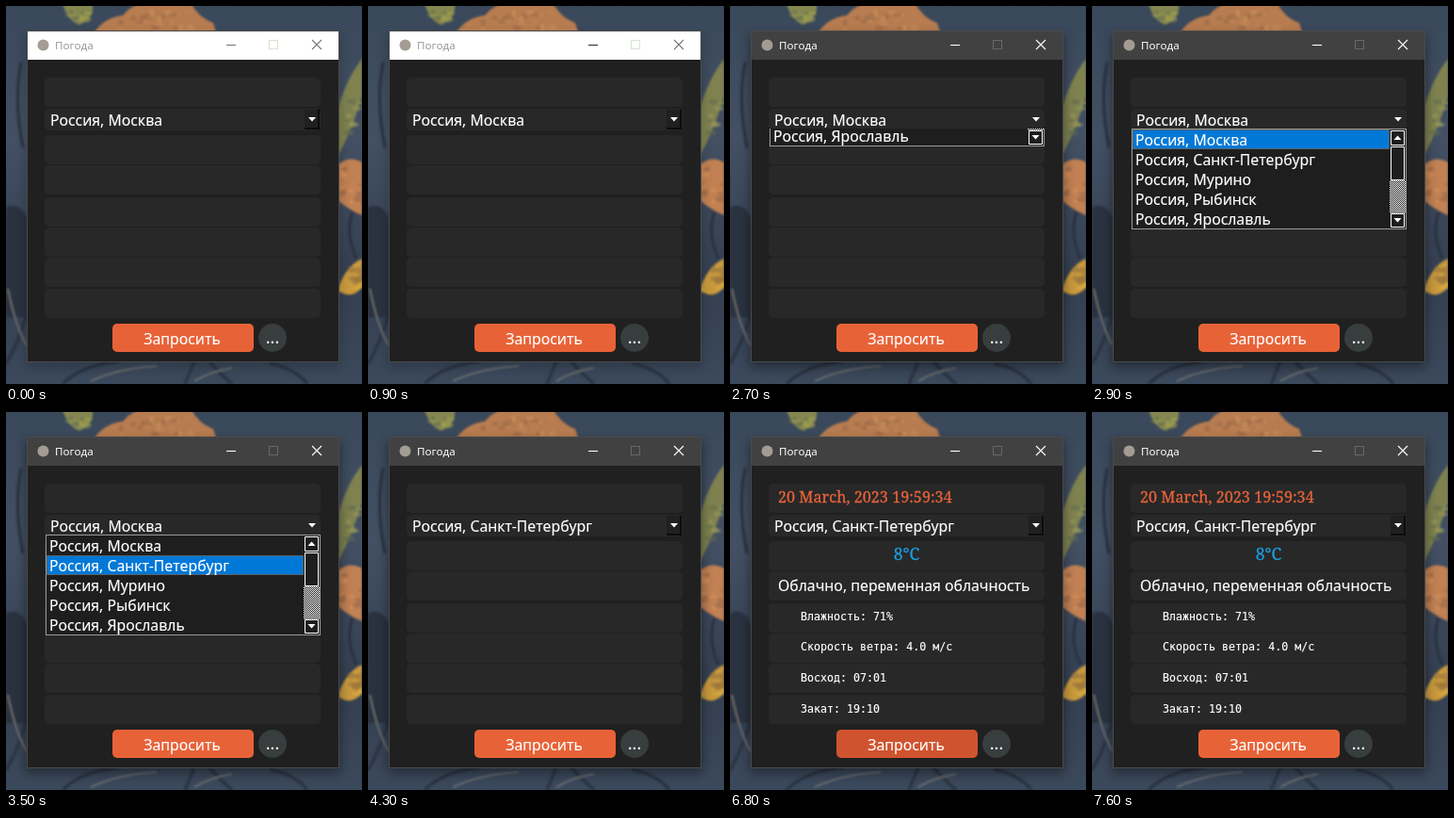
These frames come from a looping animation (378 px wide and 401 px high, 8000 ms). An HTML page:

```html
<!DOCTYPE html>
<html lang="ru">
<meta charset="utf-8">
<title>Погода</title>
<style>
  html, body { margin: 0; width: 100%; height: 100%; overflow: hidden; background: #364457 }
  svg { display: block }
  text { font: 15.75px "Noto Sans", "Open Sans", sans-serif; fill: #fff; stroke: #fff; stroke-width: .15; white-space: pre }
  #title { font-size: 11.6px; stroke: none }
  .mono { font: 11.65px "DejaVu Sans Mono", monospace }
  .slab { font: 16.2px "Noto Serif", serif; fill: #e8633a; stroke: #e8633a; stroke-width: .3 }
  .slab.blue { font-size: 17.5px; fill: #1b9fe0; stroke: #1b9fe0 }
  .icon { fill: none; stroke-width: 1.1 }
  .row { fill: #282828 }
</style>
<svg width="378" height="401" viewBox="0 0 378 401">
  <defs>
    <linearGradient id="sky" x2="0" y2="1">
      <stop stop-color="#39485a"/><stop offset=".35" stop-color="#435064"/>
      <stop offset=".72" stop-color="#343f50"/><stop offset="1" stop-color="#3b495c"/>
    </linearGradient>
    <pattern id="hatch" width="2" height="2" patternUnits="userSpaceOnUse">
      <rect width="2" height="2" fill="#1e1e1e"/><path d="M0 0h1v1H0zM1 1h1v1H1z" fill="#fff"/>
    </pattern>
    <filter id="blur" x="-20%" y="-20%" width="140%" height="140%"><feGaussianBlur stdDeviation="6"/></filter>
    <filter id="soft"><feGaussianBlur stdDeviation="1.200"/></filter>
    <clipPath id="popClip"><rect id="popRect" x="42" y="130" width="292" height="107"/></clipPath>
  </defs>

  <rect width="378" height="401" fill="url(#sky)"/>
  <g filter="url(#soft)">
    <path d="M92 30Q104 12 124 10Q136 -6 160 -4H196Q204 12 220 18L224 30z" fill="#b77c50"/>
    <path d="M60 -2H92Q94 12 78 20Q66 16 60 -2z" fill="#858751"/>
    <path d="M378 56Q362 76 352 110V160Q368 130 378 96z" fill="#7f8250"/>
    <path d="M352 168Q366 158 378 166V222Q364 216 352 206z" fill="#c18153"/>
    <path d="M378 268Q360 276 352 302Q368 312 378 298z" fill="#c99a3c"/>
    <path d="M0 214Q14 206 24 228V330H0z" fill="#2a333f"/>
    <g fill="none" stroke="#29323f" stroke-width="3">
      <path d="M368 218q-8 24 4 50M0 380q14 -24 24 -60M60 401q20 -20 60 -24M190 401l10 -24M240 401q-16 -14 -24 -24M320 401q-12 -16 -40 -22M16 60q-8 40 2 90"/>
    </g>
    <path d="M2 300q8 40 20 60M90 398q30 -14 70 -16M200 398q16 -10 40 -14" fill="none" stroke="#747572" stroke-width="1.500"/>
    <g id="leaves"></g>
  </g>
  <rect id="shadow" x="21" y="31" width="334" height="352" filter="url(#blur)"/>

  <rect x="22.5" y="26.5" width="331" height="351" fill="#202020" stroke="#4a4a4a"/>
  <rect id="bar" x="23" y="27" width="330" height="30"/>
  <circle cx="39.5" cy="41.5" r="6" fill="#a39c92"/>
  <text id="title" x="52" y="46">Погода</text>
  <path id="min" class="icon" d="M234 41.5h10"/>
  <path id="max" class="icon" d="M279.500 36.500h9v9h-9z"/>
  <path id="close" class="icon" d="M325 36l10 10M335 36l-10 10"/>

  <g id="rows"></g>
  <text id="city" x="47" y="127"></text>
  <g id="bevel">
    <path d="M317 110h16v21h-16z" fill="#0c0c0c"/>
    <path d="M317 110h14v19h-14z" fill="#202020"/>
  </g>
  <path d="M321 118h8l-4 4.500z" fill="#fff"/>

  <g id="report">
    <text class="slab" x="51" y="96">20 March, 2023 19:59:34</text>
    <text class="slab blue" x="187.500" y="157" text-anchor="middle">8°C</text>
    <text x="51" y="190">Облачно, переменная облачность</text>
    <text class="mono" x="75" y="221">Влажность: 71%</text>
    <text class="mono" x="75" y="253">Скорость ветра: 4.0 м/с</text>
    <text class="mono" x="75" y="286">Восход: 07:01</text>
    <text class="mono" x="75" y="319">Закат: 19:10</text>
  </g>

  <rect id="button" x="113" y="337" width="150" height="30" rx="5"/>
  <text x="187" y="359" text-anchor="middle">Запросить</text>
  <circle cx="283" cy="352" r="15" fill="#383d3d"/>
  <text x="283" y="358" text-anchor="middle" style="font-size:18px">...</text>

  <g id="popup" clip-path="url(#popClip)">
    <g id="list">
      <rect x="42.500" y="130.500" width="291" height="106" fill="#1e1e1e" stroke="#9a9a9a"/>
      <rect id="pick" x="43.500" width="272" height="20" fill="#0078d7" stroke="#ff9a3c" stroke-opacity=".6" stroke-dasharray="1 1"/>
      <g id="items"></g>
      <rect x="316" y="185" width="17" height="35" fill="url(#hatch)"/>
      <g fill="#1e1e1e" stroke="#fff"><path d="M317.500 132.500h14v15h-14zM317.500 149.500h14v35h-14zM317.500 220.500h14v14h-14z"/></g>
      <path d="M320.500 142h8l-4-4.500zM320.500 225h8l-4 4.500z" fill="#fff"/>
    </g>
  </g>
</svg>
<script>
const $ = id => document.getElementById(id);
const set = (id, attrs) => { for (const k in attrs) $(id).setAttribute(k, attrs[k]); };
const show = (id, on) => set(id, { visibility: on ? 'visible' : 'hidden' });
const cities = ['Москва', 'Санкт-Петербург', 'Мурино', 'Рыбинск', 'Ярославль'].map(c => 'Россия, ' + c);

$('rows').innerHTML = [76, 109, 137, 169, 203, 235, 267, 300]
  .map(y => `<rect class="row" x="41" y="${y}" width="293" height="${y === 109 ? 23 : 31}" rx="5"/>`).join('');
$('items').innerHTML = cities.map((c, i) => `<text x="46" y="${148 + 21 * i}">${c}</text>`).join('');

// Light and dark dabs over the foliage
let seed = 7;
const rnd = () => (seed = seed * 16807 % 2147483647) / 2147483647;
const dabs = (x, y, w, h, n, colors) => Array.from({ length: n }, () =>
  `<ellipse cx="${x + rnd() * w}" cy="${y + rnd() * h}" rx="${2 + rnd() * 4}" ry="${1 + rnd() * 3}"
    fill="${colors[rnd() * colors.length | 0]}" opacity=".6"/>`).join('');
$('leaves').innerHTML =
  dabs(122, 4, 80, 22, 24, ['#cf945c', '#98694a', '#c58a58']) +
  dabs(64, 0, 24, 14, 8, ['#a3a350', '#5f6a50']) +
  dabs(358, 95, 20, 40, 8, ['#9a9a58', '#5f6a50']) +
  dabs(356, 170, 22, 38, 12, ['#d9935c', '#98694a']) +
  dabs(360, 278, 18, 22, 8, ['#e0b040', '#96733c']);

const start = performance.now();
function draw() {
  const t = (performance.now() - start) % 8000, active = t >= 1200;
  const ink = active ? '#fff' : '#777';
  set('bar', { fill: active ? '#414141' : '#fff' });
  $('title').style.fill = active ? '#fff' : '#999';
  set('min', { stroke: active ? ink : t < 800 ? '#777' : t < 900 ? '#555' : '#333' });
  set('max', { stroke: active ? '#686868' : '#d5e5d0' });
  set('close', { stroke: ink });
  set('shadow', { opacity: active ? .4 : .2 });

  // The drop-down slides open from under the field
  const lift = t < 2800 ? 88 : t < 2900 ? 42 : 0;
  show('popup', t >= 2700 && t < 4200);
  set('popRect', { height: 107 - lift });
  set('list', { transform: `translate(0 ${-lift})` });
  set('pick', { y: t < 3500 ? 131.5 : 152.5 });
  show('bevel', t < 2700 || t >= 4200);

  $('city').textContent = cities[t < 4300 ? 0 : 1];
  set('button', { fill: t >= 5500 && t < 7600 ? '#d0532f' : '#e86237' });
  show('report', t >= 6800);
  requestAnimationFrame(draw);
}
draw();
</script>
</html>
```
